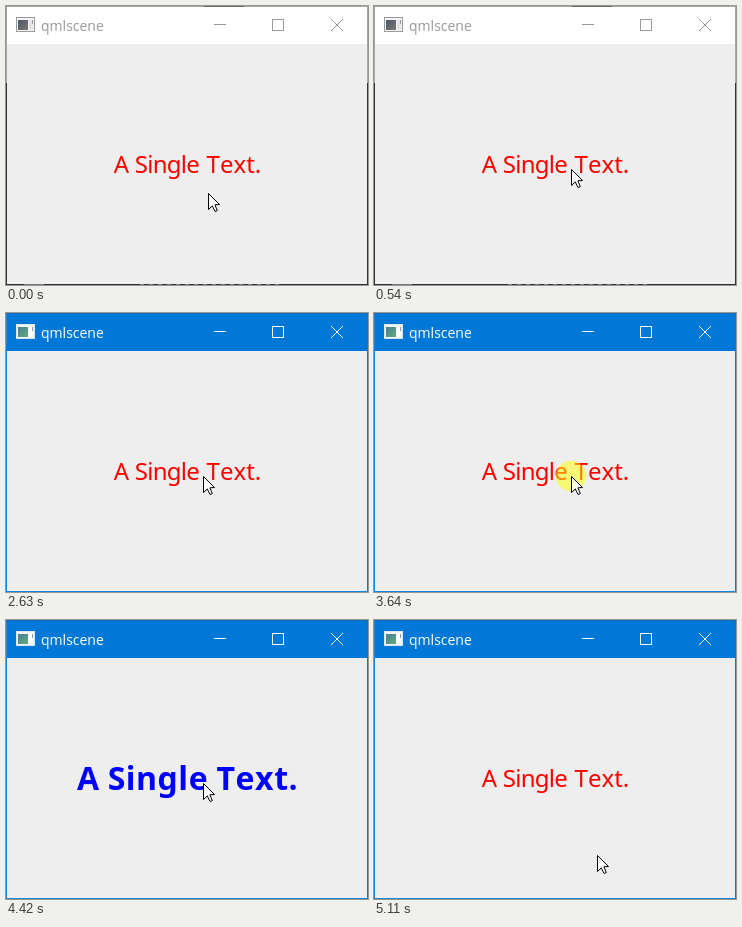
Animation, 362 px wide and 279 px high, one loop 5190 ms. Source, as an HTML page with a canvas:

```html
<!DOCTYPE html>
<html lang="en">
<head>
<meta charset="utf-8">
<title>Text state toggle</title>
<style>
html, body { margin: 0; width: 100%; height: 100%; overflow: hidden; }
canvas { display: block; }
</style>
</head>
<body>
<canvas id="stage" width="362" height="279"></canvas>
<script>
const W = 362, H = 279, LOOP = 5190;
const ctx = document.getElementById('stage').getContext('2d', { alpha: false });
ctx.fontKerning = 'none';

// Each word: text, x, letter spacing
const NORMAL = {
  font: '400 24px "Noto Sans", sans-serif', color: '#ff0000', y: 167,
  words: [['A', 107.8, 0], ['Single', 128.8, -0.75], ['Text.', 200.6, 0]]
};
const BOLD = {
  font: '700 32px "Noto Sans", sans-serif', color: '#0000ff', y: 170,
  words: [['A', 71, 0], ['Single', 101.7, 0.5], ['Text.', 210.4, 0.6]]
};
const ARROW = [[0.5, 0.5], [0.5, 16.5], [4.3, 12.9], [7, 18.5], [9.3, 17.6], [6.9, 11.8], [11.5, 11.5]];

function rect(x, y, w, h, color) {
  ctx.fillStyle = color;
  ctx.fillRect(x, y, w, h);
}

function line(points, color) {
  ctx.strokeStyle = color;
  ctx.lineWidth = 1;
  ctx.beginPath();
  points.forEach(([x, y]) => ctx.lineTo(x, y));
  ctx.stroke();
}

function border(active) {
  if (active) {
    rect(0, 0, W, 1, '#0a6cba');
    rect(0, 0, 1, H, '#1883d7');
    rect(W - 1, 0, 1, H, '#1a75b8');
    rect(0, H - 1, W, 1, '#1883d7');
    return;
  }
  rect(0, 0, W, 1, '#a6a6a6');
  rect(198, 0, 40, 1, '#6a6a6a');
  for (const x of [0, W - 1]) {
    rect(x, 0, 1, 77, '#a6a6a6');
    rect(x, 77, 1, H - 77, '#333333');
  }
  rect(0, H - 1, W, 1, '#333333');
  for (let x = 134; x < 270; x += 9) rect(x, H - 1, 4, 1, '#777777');
  rect(18, H - 1, 20, 1, '#777777');
}

function icon(active) {
  rect(10, 11, 19, 15, active ? '#d9e6ee' : '#9a9a9a');
  rect(11, 12, 17, 13, '#f4f4f4');
  const g = ctx.createLinearGradient(12, 14, 21, 24);
  g.addColorStop(0, active ? '#3f7f9c' : '#4c5868');
  g.addColorStop(1, active ? '#67a879' : '#777777');
  rect(12, 14, 10, 10, g);
  rect(23, 14, 4, 10, active ? '#ffffff' : '#e4e4e4');
  rect(26, 14, 1, 4, active ? '#8c9ca6' : '#999999');
}

function titleBar(active) {
  const ink = active ? '#ffffff' : '#999999';
  rect(0, 0, W, 38, active ? '#0078d7' : '#ffffff');
  icon(active);
  ctx.font = '400 14px "Open Sans", sans-serif';
  ctx.letterSpacing = '0px';
  ctx.fillStyle = ink;
  ctx.fillText('qmlscene', 35, 25);
  rect(208, 18, 12, 1, ink);
  ctx.strokeStyle = ink;
  ctx.lineWidth = 1;
  ctx.strokeRect(266.5, 13.5, 11, 11);
  line([[325, 13], [337, 25]], ink);
  line([[337, 13], [325, 25]], ink);
}

function label(style) {
  ctx.font = style.font;
  ctx.fillStyle = style.color;
  for (const [text, x, spacing] of style.words) {
    ctx.letterSpacing = spacing + 'px';
    ctx.fillText(text, x, style.y);
  }
}

function highlight(x, y) {
  ctx.fillStyle = 'rgba(255, 255, 0, 0.5)';
  ctx.beginPath();
  ctx.arc(x, y, 15.3, 0, Math.PI * 2);
  ctx.fill();
}

function cursor(x, y) {
  ctx.save();
  ctx.translate(x, y);
  ctx.beginPath();
  ARROW.forEach(([px, py]) => ctx.lineTo(px, py));
  ctx.closePath();
  ctx.fillStyle = '#ffffff';
  ctx.fill();
  ctx.strokeStyle = '#000000';
  ctx.lineWidth = 1;
  ctx.stroke();
  ctx.restore();
}

// Progress 0..1 in n discrete moves, the first at a and the last at b
function stepped(t, a, b, n) {
  if (t < a) return 0;
  if (t >= b) return 1;
  return (Math.floor((t - a) / (b - a) * (n - 1)) + 1) / n;
}

function pointer(t) {
  if (t < 4880) {
    const p = stepped(t, 80, 540, 7);
    return [Math.round(202 - 5 * p - 3 * Math.sin(Math.PI * p)), Math.round(187 - 24 * p)];
  }
  const p = stepped(t, 4880, 5110, 4);
  return [Math.round(197 + 26 * p), Math.round(163 + 72 * p)];
}

const within = (t, a, b) => t >= a && t < b;

function draw(t) {
  const active = t >= 1240;
  const bold = within(t, 1240, 2630) || within(t, 3720, 4500);
  const pressed = within(t, 1240, 2630) || within(t, 3640, 4420);
  const [x, y] = pointer(t);
  rect(0, 0, W, H, '#eeeeee');
  titleBar(active);
  border(active);
  label(bold ? BOLD : NORMAL);
  if (pressed) highlight(x, y);
  cursor(x, y);
}

const start = performance.now();
function tick() {
  draw((performance.now() - start) % LOOP);
  requestAnimationFrame(tick);
}
tick();
</script>
</body>
</html>
```
